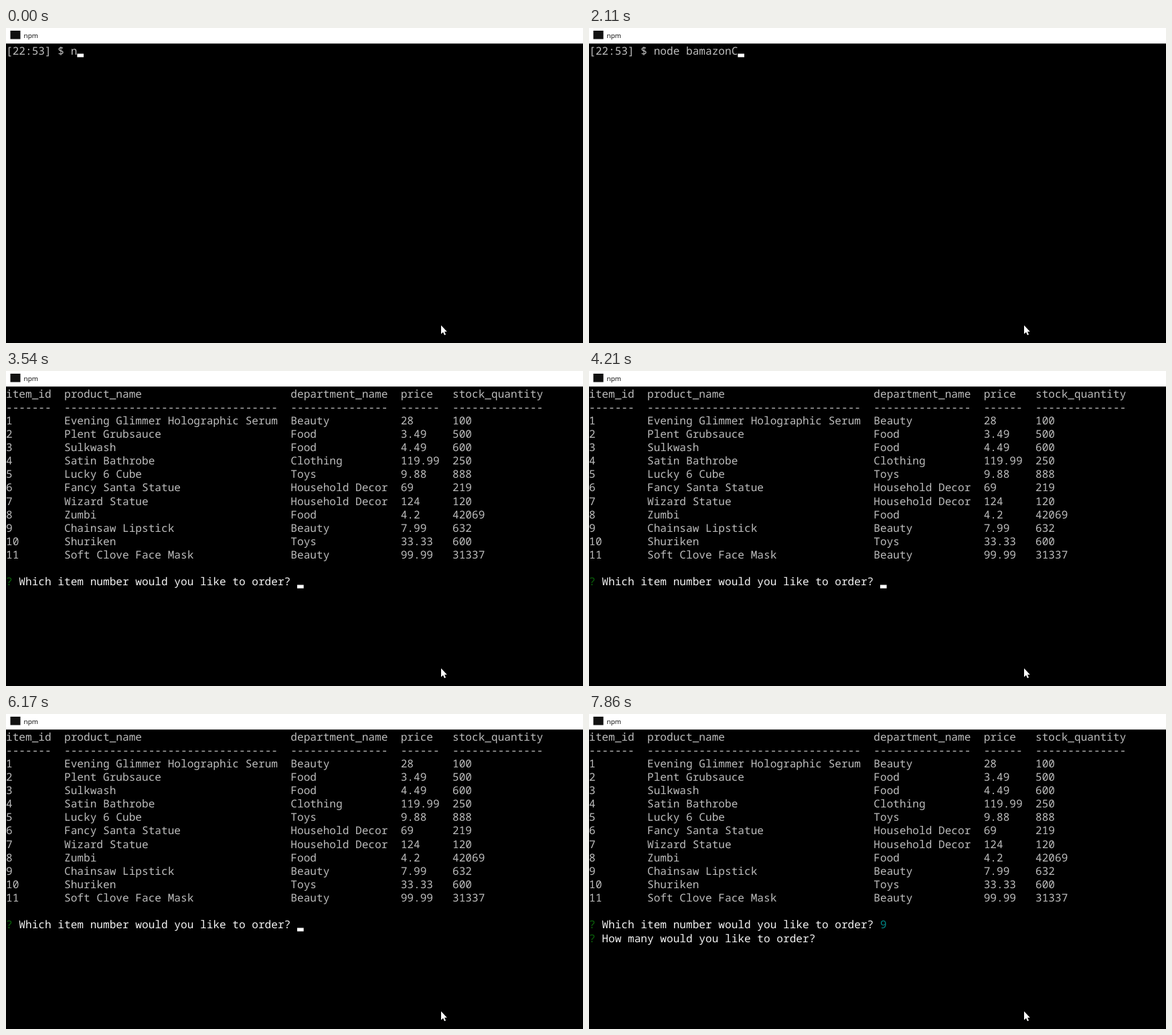
An HTML page for the animation above (7990 ms loop, 862 by 472 pixels).

```html
<!DOCTYPE html>
<html lang="en">
<head>
<meta charset="utf-8">
<title>Terminal</title>
<style>
  html, body { margin: 0; width: 100%; height: 100%; overflow: hidden; background: #000; }
  svg { display: block; width: 100%; height: 100%; }
  text { white-space: pre; text-rendering: geometricPrecision; }
  #screen text { font: 16.11px "Noto Sans Mono", monospace; fill: #bdbdbd; }
  #screen .bright { fill: #f4f4f4; }
  #screen .mark { fill: #0a620a; }
  #screen .answer { fill: #008484; }
  .title { font: 9.9px "Open Sans", "Noto Sans", sans-serif; fill: #000; }
</style>
</head>
<body>
<svg viewBox="0 0 862 472">
  <rect width="862" height="472"/>
  <rect width="862" height="23.3" fill="#fff"/>
  <rect x="6.5" y="4" width="15" height="12.6" fill="#111"/>
  <text class="title" x="26.6" y="15.4">npm</text>
  <g id="screen"></g>
  <path d="M650 445.6V458.6L653 455.8L655 460.2L657 459.3L655.1 455.1H658.8Z" fill="#fff"/>
</svg>
<script>
const LOOP = 7990;
const CELL = 9.667, LINE = 20.14, TOP = 23.5;
const SHELL = "[22:53] $ ";
const COMMAND = "node bamazonCustomer.js ";
const ASK_ITEM = "Which item number would you like to order? ";
const ASK_COUNT = "How many would you like to order? ";

const WIDTHS = [7, 33, 15, 6, 14];
const ITEMS = [
  ["Evening Glimmer Holographic Serum", "Beauty", "28", "100"],
  ["Plent Grubsauce", "Food", "3.49", "500"],
  ["Sulkwash", "Food", "4.49", "600"],
  ["Satin Bathrobe", "Clothing", "119.99", "250"],
  ["Lucky 6 Cube", "Toys", "9.88", "888"],
  ["Fancy Santa Statue", "Household Decor", "69", "219"],
  ["Wizard Statue", "Household Decor", "124", "120"],
  ["Zumbi", "Food", "4.2", "42069"],
  ["Chainsaw Lipstick", "Beauty", "7.99", "632"],
  ["Shuriken", "Toys", "33.33", "600"],
  ["Soft Clove Face Mask", "Beauty", "99.99", "31337"]
];
const TABLE = [
  ["item_id", "product_name", "department_name", "price", "stock_quantity"],
  WIDTHS.map(w => "-".repeat(w)),
  ...ITEMS.map((item, i) => [String(i + 1), ...item])
];

// [time, text after the shell prompt]; includes one mistyped letter
const TYPING = [
  [0, "n"], [100, "no"], [130, "nod"], [390, "node"], [520, "node "],
  [780, "node a"], [1050, "node "], [1190, "node ba"], [1320, "node bam"],
  [1460, "node bama"], [1590, "node bamaz"], [1720, "node bamazo"],
  [1850, "node bamazon"], [2110, "node bamazonC"], [2370, COMMAND]
];
const ENTER = 3020, RESULT = 3540, PICK = 6560, CONFIRM = 7470;

// [time, caret visible]
const BLINK = [
  [0, true], [2630, false], [3020, true], [3150, false], [3540, true],
  [3680, false], [4070, true], [4600, false], [5130, true], [5650, false],
  [6170, true], [6690, false], [7210, true], [7730, false]
];

const screen = document.getElementById("screen");

function add(tag, attrs, parent = screen) {
  const el = document.createElementNS("http://www.w3.org/2000/svg", tag);
  for (const key in attrs) el.setAttribute(key, attrs[key]);
  return parent.appendChild(el);
}

function write(row, col, string, cls = "", parent = screen) {
  const el = add("text", { x: col * CELL, y: TOP + row * LINE + 16, class: cls }, parent);
  el.textContent = string;
  return el;
}

function question(row, string) {
  const group = add("g", {});
  write(row, 0, "?", "mark", group);
  write(row, 2, string, "bright", group);
  return group;
}

const valueAt = (steps, t) => steps.filter(s => s[0] <= t).pop()[1];
const show = (el, on) => el.setAttribute("visibility", on ? "visible" : "hidden");

const shell = write(0, 0, SHELL);
const table = add("g", {});
TABLE.forEach((cells, row) => {
  let col = 0;
  cells.forEach((cell, i) => {
    write(row, col, cell, "", table);
    col += WIDTHS[i] + 2;
  });
});
const itemCol = 2 + ASK_ITEM.length;
const askItem = question(14, ASK_ITEM);
const askCount = question(15, ASK_COUNT);
const answer = write(14, itemCol, "9");
const caret = add("rect", { width: CELL, height: 5.2, fill: "#fff" });

function caretCell(t, typed) {
  if (t >= CONFIRM) return [15, 2 + ASK_COUNT.length];
  if (t >= PICK) return [14, itemCol + 1];
  if (t >= RESULT) return [14, itemCol];
  if (t >= ENTER) return [1, 0];
  return [0, SHELL.length + typed.length];
}

function render(t) {
  const typed = valueAt(TYPING, t);
  shell.textContent = SHELL + typed;
  show(shell, t < RESULT);
  show(table, t >= RESULT);
  show(askItem, t >= RESULT);
  show(answer, t >= PICK);
  answer.setAttribute("class", t >= CONFIRM ? "answer" : "");
  show(askCount, t >= CONFIRM);

  const [row, col] = caretCell(t, typed);
  caret.setAttribute("x", col * CELL);
  caret.setAttribute("y", TOP + row * LINE + 15);
  show(caret, valueAt(BLINK, t));
}

const start = performance.now();
function tick() {
  render((performance.now() - start) % LOOP);
  requestAnimationFrame(tick);
}
tick();
</script>
</body>
</html>
```
